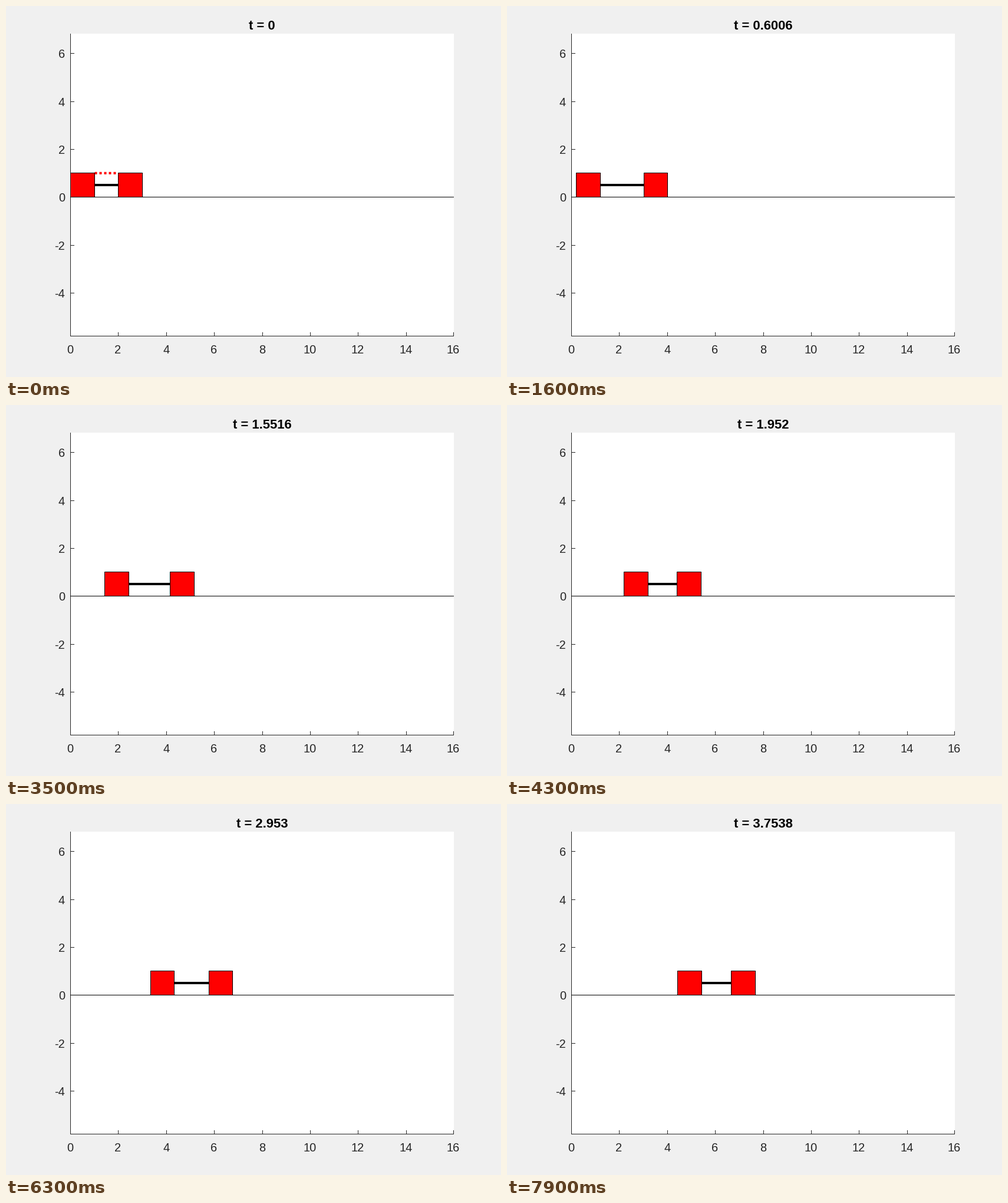
Write a matplotlib script that moves like this. It is 840 px wide and 630 px high and loops after 8 s.

```python
import math

import matplotlib.pyplot as plt
from matplotlib.animation import FuncAnimation
from matplotlib.patches import Rectangle

W, H, DPI = 840, 630, 100
PX = 72 / DPI                  # points per pixel
LEFT, ZERO, UNIT = 109, 324.2, 651 / 16
GREY = "#262626"
DT = 50 / 999                  # simulated time per step

# Spring and blocks: pushed off a wall, then free
REST, SQUEEZE, OMEGA = 2.5, 0.5, 5.0
T_FREE = math.pi / (2 * OMEGA)
V_CM = SQUEEZE * OMEGA / 2

plt.rcParams.update({"font.family": "Liberation Sans", "path.snap": False})


def snap(v):
    return math.floor(v + 0.5) + 0.5


def col(x):
    return snap(LEFT + UNIT * x)


def positions(t):
    """Left edges of both blocks at time t."""
    if t < T_FREE:
        return 0.0, REST - SQUEEZE * math.cos(OMEGA * t)
    s = t - T_FREE
    gap = REST + SQUEEZE / math.sqrt(2) * math.sin(math.sqrt(2) * OMEGA * s)
    mid = REST / 2 + V_CM * s
    return mid - gap / 2, mid + gap / 2


fig = plt.figure(figsize=(W / DPI, H / DPI), dpi=DPI, facecolor="#f0f0f0")
ax = fig.add_axes([0, 0, 1, 1])
ax.set_xlim(0, W)
ax.set_ylim(H, 0)
ax.axis("off")


def line(xs, ys, color, width=1, z=5, **kw):
    kw.setdefault("solid_capstyle", "butt")
    return ax.plot(xs, ys, color=color, lw=width * PX, zorder=z, **kw)[0]


def label(x, y, s, ha="center", size=20, color=GREY, weight="normal"):
    return ax.text(x, y, s, ha=ha, va="baseline", fontsize=size * PX,
                   color=color, weight=weight)


ax.add_patch(Rectangle((109, 47), 651, 514, fc="white", ec="none", zorder=0))
line([109, 760], [560.5, 560.5], GREY)
line([109.5, 109.5], [47, 561], GREY)

for v in range(0, 17, 2):
    x = min(col(v), 759.5)
    line([x, x], [554, 561], GREY)
    label(x - 0.5, 590, str(v))

for v in range(-4, 7, 2):
    y = snap(ZERO - UNIT * v + 0.1)
    line([109, 116], [y, y], GREY)
    label(100, y + 7.5, str(v), ha="right")

line([109, 760], [324.5, 324.5], "black", z=6)

title = label(434.7, 40, "", size=22, color="black", weight="bold")
spring = line([], [], "black", 4, z=2)
thread = line([], [], "red", 4, z=2, linestyle=(0, (1, 1)),
              dash_capstyle="butt")
blocks = [Rectangle((0, 324.5), 41, -41, fc="red", ec="black", lw=PX,
                    joinstyle="miter", zorder=4) for _ in range(2)]
for b in blocks:
    ax.add_patch(b)


def draw(i):
    step = max(0, i - 4)
    t = step * DT
    x1, x2 = positions(t)
    for b, x in zip(blocks, (x1, x2)):
        b.set_x(col(x))
        b.set_width(col(x + 1) - col(x))
    ends = [col(x1 + 1), col(x2)]
    spring.set_data(ends, [304, 304])
    thread.set_data(ends, [283.8, 283.8])
    thread.set_visible(step == 0)
    title.set_text(f"t = {t:.5g}")
    return [title, spring, thread, *blocks]


anim = FuncAnimation(fig, draw, frames=80, interval=100, repeat=True,
                     repeat_delay=0, init_func=lambda: draw(0))
plt.show()
```
